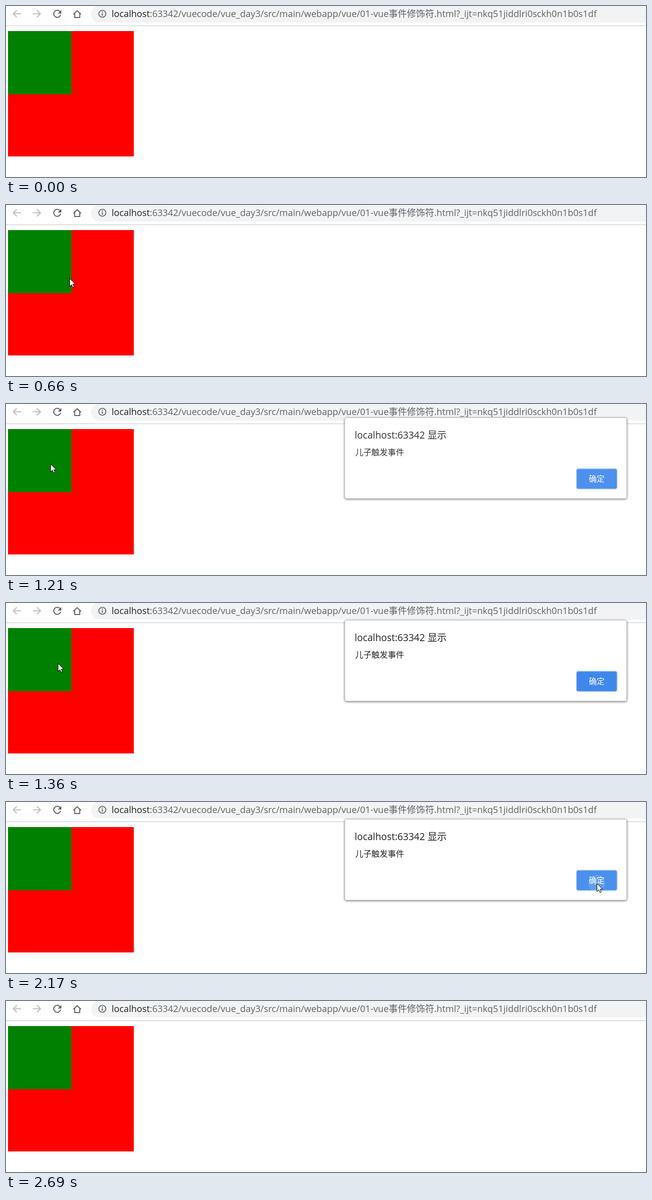
Animation, 1272 px wide and 341 px high, one loop 3150 ms. Source, as an HTML page:

```html
<!DOCTYPE html>
<html lang="zh-CN">
<head>
<meta charset="utf-8">
<style>
html, body { margin: 0; width: 100%; height: 100%; overflow: hidden; background: #fff; }
svg { display: block; width: 1272px; height: 341px; }
text { font-family: "Open Sans", "Noto Sans CJK SC", "Noto Sans CJK", sans-serif; }
.icon { fill: none; stroke: #5f6368; stroke-width: 2; }
.off { stroke: #bcbec0; }
#dialog rect:first-child { filter: drop-shadow(0 1px 2px #0009); }
</style>
</head>
<body>
<svg viewBox="0 0 1272 341">
  <!-- address bar -->
  <rect x="169" y="-1" width="1130" height="34" rx="17" fill="#f1f3f4"/>
  <rect y="38.5" width="1272" height="1.7" fill="#d9dadc"/>
  <path class="icon off" d="M30 15.5H15M21.5 8.5l-7 7 7 7M53 15.5H68M61.5 8.5l7 7-7 7"/>
  <path class="icon" d="M107.3 11.2A7 7 0 1 0 108.6 17.5"/>
  <path d="M110 8v7h-7z" fill="#5f6368"/>
  <path class="icon" d="M134 16.5l7.5-7.2 7.5 7.2M136.5 15v8h10v-8"/>
  <circle class="icon" cx="191.5" cy="15.5" r="7" style="stroke-width:1.7"/>
  <path class="icon" d="M191.5 14.5v5M191.5 11v2"/>
  <text x="210" y="22" font-size="18.1" fill="#5f6368"><tspan fill="#202124">localhost</tspan>:63342/vuecode/vue_day3/src/main/webapp/vue/01-vue事件修饰符.html?_ijt=nkq51jiddlri0sckh0n1b0s1df</text>

  <rect x="4" y="50" width="250" height="250" fill="red"/>
  <rect x="4" y="50" width="126" height="126" fill="green"/>

  <g id="dialog">
    <rect x="673.5" y="34.5" width="560" height="161" rx="3" fill="#fff" stroke="#c4c4c4"/>
    <text x="693" y="76" font-size="19.1" fill="#202124">localhost:63342 显示</text>
    <text x="694" y="109" font-size="16.2" fill="#202124">儿子触发事件</text>
    <rect id="button" x="1133.7" y="136" width="80.8" height="40.5" rx="4" stroke="#a9caf7" stroke-width="1.4"/>
    <circle id="ripple" cx="1174" cy="162" r="17" fill="#fff" opacity=".13"/>
    <text x="1158.5" y="162" font-size="15.5" fill="#fff">确定</text>
  </g>
  <path id="cursor" d="M.5 .5V16.5L4.2 13 6.7 18.5 9.3 17.4 6.8 12H11.8Z" fill="#fff" stroke="#000"/>
</svg>
<script>
const LOOP = 3150;
const $ = id => document.getElementById(id);

// Pointer: [time, x, y], each position held until the next
const pointer = [[0]];
for (let i = 0; i < 7; i++) {
  const rest = 1 - i / 6;
  pointer.push([360 + 75 * i, 102 + 660 * rest ** 3, 126 + 184 * rest ** 2]);
}
pointer.push(
  [900, 84, 121], [975, 73, 118], [1050, 88, 119], [1360, 103, 120],
  [1440, 330, 135], [1510, 640, 158], [1590, 930, 178], [1670, 1120, 190],
  [1750, 1193, 195], [1850, 1182, 175], [1920, 1174, 162],
  [2530, 1190, 185], [2610, 1234, 243], [2690]
);

// Dialog: [time, vertical offset, opacity]
const dialog = [
  [0, 0, 0], [1130, -14, .45], [1210, -7, .92], [1290, -2, .98], [1360, 0, 1],
  [2240, -7, .75], [2320, -16, .25], [2400, 0, 0]
];

const at = (steps, t) => steps.findLast(s => s[0] <= t);

function draw(now) {
  const t = now % LOOP;
  const [, x, y] = at(pointer, t);
  const [, dy, alpha] = at(dialog, t);
  $("cursor").setAttribute("visibility", x === undefined ? "hidden" : "visible");
  if (x !== undefined) $("cursor").setAttribute("transform", `translate(${Math.round(x)} ${Math.round(y)})`);
  $("dialog").setAttribute("transform", `translate(0 ${dy})`);
  $("dialog").setAttribute("opacity", alpha);
  $("button").setAttribute("fill", t < 1850 ? "#4087ec" : "#4a90ed");
  $("ripple").setAttribute("visibility", t >= 2080 ? "visible" : "hidden");
  requestAnimationFrame(draw);
}
requestAnimationFrame(draw);
</script>
</body>
</html>
```
